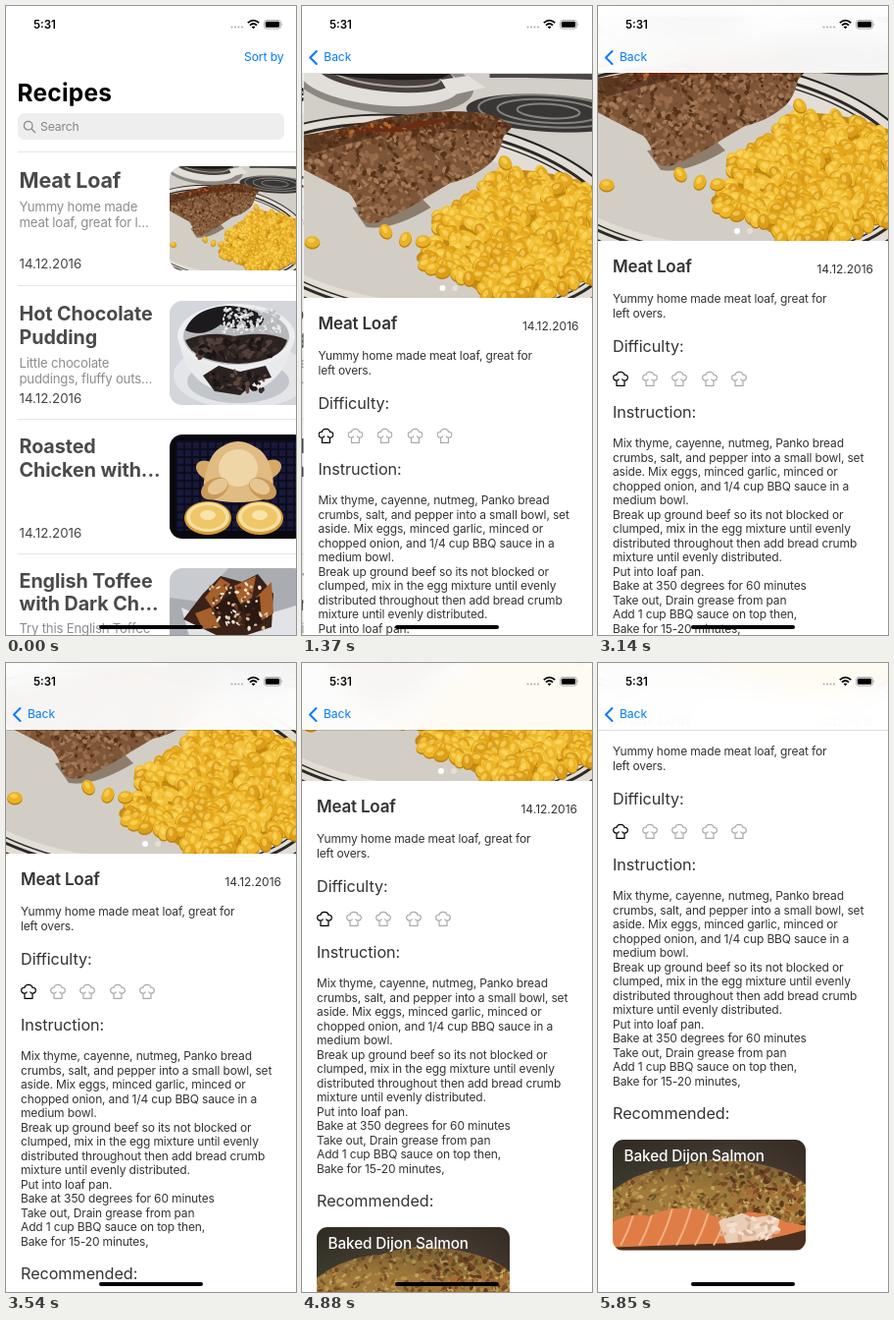
Animation, 296 px wide and 640 px high, one loop 5970 ms. Source, as an HTML page with a canvas:

```html
<!DOCTYPE html>
<html lang="en">
<head>
<meta charset="utf-8">
<title>Recipes</title>
<style>
@property --p { syntax: "<number>"; inherits: true; initial-value: 1; }
@property --s { syntax: "<number>"; inherits: true; initial-value: 0; }
html, body { margin: 0; width: 100%; height: 100%; overflow: hidden; background: #fff; }
#stage {
  position: relative; width: 296px; height: 640px; overflow: hidden; background: #fff;
  font-family: Inter, "Liberation Sans", sans-serif; font-optical-sizing: none;
  animation: push 5970ms step-end infinite, scroll 5970ms step-end infinite;
}
#stage * { position: absolute; }
svg * { position: static; }
/* --p: share of the detail page still off to the right */
@keyframes push {
  0% { --p: 1; }
  15.41% { --p: .78; }
  17.25% { --p: .37; }
  19.09% { --p: .13; }
  21.1% { --p: .035; }
  22.94% { --p: .005; }
  45.72%, 100% { --p: 0; }
}
/* --s: scroll distance of the detail page */
@keyframes scroll {
  0% { --s: 0; }
  45.72% { --s: 7.5; }
  47.73% { --s: 16; }
  50.58% { --s: 34; }
  52.42% { --s: 58; }
  54.27% { --s: 78; }
  56.11% { --s: 92; }
  59.29% { --s: 103; }
  61.3% { --s: 126; }
  63.14% { --s: 150; }
  64.99% { --s: 164; }
  66.83% { --s: 169; }
  81.74% { --s: 177; }
  83.75% { --s: 207; }
  85.59% { --s: 242; }
  87.43% { --s: 270; }
  89.27% { --s: 288; }
  91.12% { --s: 295; }
  92.79% { --s: 290; }
  94.47% { --s: 279; }
  96.31% { --s: 270; }
  97.98%, 100% { --s: 266; }
}
.page { left: 0; top: 0; width: 296px; height: 640px; background: #fff; }
#list { transform: translateX(calc((var(--p) - 1) * 88.8px)); width: 400px; }
#dim { inset: 0; background: #000; opacity: calc((1 - var(--p)) * .1); }
#detail { transform: translateX(calc(var(--p) * 296px)); overflow: hidden; }
#scroller { left: 0; top: 0; width: 296px; height: 900px; transform: translateY(calc(var(--s) * -1px)); }
#line { left: 0; top: 68px; width: 296px; height: 1px; background: rgba(0,0,0,.13); }
#bar { left: 0; top: 0; width: 296px; height: 68px; background: rgba(255,255,255,.94); backdrop-filter: blur(12px); }
#back { left: 0; top: 0; opacity: calc(1 - var(--p)); transform: translateX(calc(var(--p) * 60px)); }
#sort { left: 0; top: 0; opacity: var(--p); }
#field { left: 12px; top: 109px; width: 272px; height: 27px; border-radius: 7px; background: #eeeeef; }
#home { left: 95px; top: 630px; width: 106px; height: 4px; border-radius: 2px; background: #000; }
.sep { left: 12px; width: 388px; height: 1px; background: #e6e6e7; }
.dot { width: 6px; height: 6px; border-radius: 3px; top: 284px; background: #fff; }
.t { line-height: 0; white-space: pre; color: #333; }
.r { transform: translateX(-100%); }
.clock { font: 600 11.5px/0 Inter, sans-serif; color: #000; }
.link { font-size: 12.15px; letter-spacing: -.1px; color: #007aff; }
.large { font-size: 24.5px; font-weight: 700; letter-spacing: .2px; color: #000; }
.hint { font-size: 12.15px; letter-spacing: -.1px; color: #85858a; }
.name { font-size: 19.7px; font-weight: 700; letter-spacing: -.05px; color: #4a4a4a; }
.big { font-size: 21.5px; letter-spacing: -.15px; }
.blurb { font-size: 13.2px; letter-spacing: -.2px; color: #8d8d90; }
.date { font-size: 13.3px; color: #444; }
.small { font-size: 12px; }
.head { font-size: 17px; font-weight: 600; letter-spacing: -.2px; }
.sub { font-size: 16.2px; letter-spacing: -.05px; }
.body { font-size: 12px; letter-spacing: -.15px; }
.card { font-size: 15.3px; font-weight: 500; letter-spacing: -.1px; color: #fff; }
</style>
</head>
<body>
<div id="stage">
  <div id="list" class="page">
    <div id="field"></div>
    <svg style="left:17px;top:116px" width="14" height="14" fill="none" stroke="#85858a" stroke-width="1.2"><circle cx="5.7" cy="5.7" r="4.3"/><path d="M9 9l4 4"/></svg>
    <div id="dim"></div>
  </div>
  <div id="detail" class="page">
    <div id="scroller"></div>
    <div id="line"></div>
  </div>
  <div id="bar"></div>
  <div id="sort"></div>
  <div id="back">
    <svg style="left:6px;top:44px" width="10" height="17" fill="none" stroke="#007aff" stroke-width="2" stroke-linecap="round" stroke-linejoin="round"><path d="M8.5 2L2 8.5L8.5 15"/></svg>
  </div>
  <svg id="status" style="left:228px;top:10px" width="60" height="18">
    <g fill="#aaa"><circle cx="2.5" cy="11.5" r="1"/><circle cx="6" cy="11.5" r="1"/><circle cx="9.5" cy="11.5" r="1"/><circle cx="13" cy="11.5" r="1"/></g>
    <g fill="none" stroke="#000" stroke-width="1.8"><path d="M18.8 7.2Q24.5 2 30.2 7.2"/><path d="M21 9.6Q24.5 6.5 28 9.6"/></g>
    <path d="M22.6 11.2Q24.5 9.6 26.4 11.2L24.5 13.3Z"/>
    <rect x="35.5" y="4.5" width="17" height="8.6" rx="2.5" fill="none" stroke="#999" stroke-width=".8"/>
    <rect x="36.8" y="5.8" width="14.4" height="6" rx="1.4"/>
    <path d="M53.6 7.3Q55.2 8.8 53.6 10.3Z" fill="#999"/>
  </svg>
  <div id="home"></div>
</div>
<script>
const $ = id => document.getElementById(id);
const list = $('list'), dim = $('dim'), scroller = $('scroller');

function add(parent, tag, cls, left, top) {
  const el = document.createElement(tag);
  el.className = cls;
  if (left !== undefined) el.style.left = left + 'px';
  if (top !== undefined) el.style.top = top + 'px';
  parent.insertBefore(el, parent === list ? dim : null);
  return el;
}
// y is the middle of the capitals
function text(parent, x, y, cls, str) {
  add(parent, 'span', 't ' + cls, x, y).textContent = str;
}
function photo(parent, x, y, w, h, radius, draw, sx = 1, sy = 1) {
  const el = add(parent, 'canvas', '', x, y);
  el.width = w * 2;
  el.height = h * 2;
  el.style.cssText += `width:${w}px;height:${h}px;border-radius:${radius}px`;
  const c = el.getContext('2d');
  c.scale(2 * sx, 2 * sy);
  draw(c);
}

const random = seed => () => (seed = seed * 16807 % 2147483647) / 2147483647;
const probe = document.createElement('canvas').getContext('2d');
function fill(c, color, d) {
  c.fillStyle = color;
  c.fill(new Path2D(d));
}
function oval(c, color, x, y, rx, ry, turn = 0) {
  c.fillStyle = color;
  c.beginPath();
  c.ellipse(x, y, rx, ry, turn, 0, 7);
  c.fill();
}
function ring(c, color, width, x, y, rx, ry, turn = 0) {
  c.strokeStyle = color;
  c.lineWidth = width;
  c.beginPath();
  c.ellipse(x, y, rx, ry, turn, 0, 7);
  c.stroke();
}
function within(c, d, draw) {
  c.save();
  c.clip(new Path2D(d));
  draw();
  c.restore();
}
function speckle(c, seed, n, x, y, w, h, size, colors) {
  const r = random(seed);
  for (let i = 0; i < n; i++) {
    const color = colors[Math.floor(r() * colors.length)];
    oval(c, color, x + r() * w, y + r() * h, size * (.4 + r()), size * (.3 + r() * .6), r() * 3);
  }
}
function kernel(c, x, y, turn, color) {
  oval(c, '#bd8310', x, y + 1.3, 7.8, 6.2, turn);
  oval(c, color, x, y, 7.6, 5.8, turn);
  oval(c, 'rgba(255,226,120,.55)', x - 1, y - 1.6, 4, 2.4, turn);
}

function meat(c) {
  fill(c, '#d2cec8', 'M-10 0H350V230H-10Z');
  // stove top
  oval(c, '#8c8781', 82, 8, 92, 32, .1);
  oval(c, '#e2dfda', 78, 6, 82, 26, .1);
  oval(c, '#4a423c', 84, 0, 70, 18, .1);
  ring(c, '#aaa59f', 2, 84, 0, 56, 12, .1);
  fill(c, '#1c1917', 'M26 0H150L140 5Q80 9 26 0Z');
  fill(c, '#e4e1dd', 'M140 6L168 2L186 14L150 22Z');
  fill(c, '#4d4844', 'M190 0H350V9Q250 3 190 4Z');
  oval(c, '#393735', 250, 40, 84, 19, .06);
  for (const k of [.85, .62, .38]) ring(c, '#85827f', 2, 250, 38, 84 * k, 19 * k, .06);
  // plate
  oval(c, '#242220', 120, 152, 219, 109, .12);
  oval(c, '#e2ded6', 120, 150, 215, 105, .12);
  ring(c, '#2b2926', 3, 120, 150, 203, 97, .12);
  ring(c, '#2b2926', 1.5, 120, 150, 196, 92, .12);
  oval(c, '#d3cec5', 110, 152, 178, 80, .12);
  fill(c, 'rgba(95,72,52,.6)', 'M50 136L64 156Q90 160 130 136L120 126Z');

  const loaf = 'M-10 64Q30 58 57 51Q90 42 123 40Q160 36 188 41Q204 46 213 54L204 64Q200 84 188 93Q172 106 150 111L128 124Q100 142 76 151Q62 154 57 144Q54 128 46 121Q24 110-10 92Z';
  fill(c, '#7d5537', loaf);
  within(c, loaf, () => {
    speckle(c, 11, 1500, -10, 36, 230, 120, 3, ['#93694a', '#a67c58', '#6c4529', '#553319', '#80573a', '#996e4b']);
    fill(c, 'rgba(66,34,16,.55)', 'M-10 62Q60 42 165 36L213 54L186 58Q120 52 66 66L-10 86Z');
    speckle(c, 5, 200, 0, 40, 212, 24, 2.5, ['#5a2f18', '#7b4625', '#8e6038']);
    fill(c, '#6b2c13', 'M28 66Q60 50 95 54Q130 44 160 46Q125 52 96 59Q60 58 28 66Z');
    speckle(c, 8, 14, 45, 50, 80, 10, 2.5, ['#b5662c', '#8e3b18']);
  });

  const corn = new Path2D('M116 190Q112 182 132 176L136 144Q152 132 178 122Q186 104 208 98Q250 96 300 116L350 130V196L276 212Q250 230 196 230Q176 222 156 204Q136 204 116 190Z');
  c.fillStyle = '#c48a16';
  c.fill(corn);
  const r = random(77), shades = ['#edb628', '#e4a81c', '#f2c23a', '#dc9e18'];
  for (let i = 0; i < 900; i++) {
    const x = 98 + r() * 250, y = 90 + i / 900 * 142, turn = r() * 3;
    if (probe.isPointInPath(corn, x, y)) kernel(c, x, y, turn, shades[i % 4]);
  }
  [[9, 171], [84, 160], [104, 168], [122, 170], [206, 90]].forEach(([x, y], i) => kernel(c, x, y, i, '#e9b224'));
}

function pudding(c) {
  fill(c, '#d3d6da', 'M0 0H140V106H0Z');
  oval(c, '#e3e5e8', 74, 76, 70, 34);
  oval(c, '#c2c5ca', 70, 82, 52, 22);
  fill(c, '#e9eaec', 'M9 36Q16 92 68 94Q118 92 127 36Z');
  oval(c, '#eceef0', 68, 36, 60, 33);
  oval(c, '#b6b8bc', 68, 36, 54, 29);
  fill(c, '#2c2321', 'M16 40Q40 30 66 36Q100 30 120 40Q114 62 70 64Q24 62 16 40Z');
  speckle(c, 21, 80, 26, 38, 84, 20, 3.5, ['#3e302b', '#1d1615', '#54413a']);
  fill(c, '#1c1a1c', 'M16 30Q24 8 58 5Q92 6 98 22Q76 34 52 24Q34 38 16 30Z');
  speckle(c, 4, 150, 55, 8, 58, 24, 2, ['#d8d9db', '#bcbdc0', '#eeeeef']);
  fill(c, '#2a2220', 'M34 76L50 66L72 72L98 66L104 78L88 82L72 96L46 92Z');
  speckle(c, 9, 45, 38, 72, 62, 20, 3, ['#3a2d29', '#1b1514', '#5a4740']);
}

function chicken(c) {
  fill(c, '#08080e', 'M0 0H140V106H0Z');
  fill(c, '#17183a', 'M6 6H140V98H6Z');
  c.fillStyle = '#0c0c1e';
  for (let i = 0; i < 18; i++) c.fillRect(6 + i * 8, 6, 2, 92);
  for (let i = 0; i < 12; i++) c.fillRect(6, 6 + i * 8, 134, 2);
  oval(c, '#d6a968', 40, 37, 14, 9, .5);
  oval(c, '#d6a968', 101, 36, 14, 9, -.5);
  fill(c, '#e0bc82', 'M54 12Q70 2 86 12Q100 18 104 38Q110 58 96 66Q70 72 42 66Q30 56 38 36Q42 18 54 12Z');
  oval(c, '#efd6a6', 70, 34, 20, 19);
  oval(c, '#cb9a58', 46, 55, 15, 10, -.5);
  oval(c, '#cb9a58', 95, 55, 15, 10, .5);
  oval(c, '#e7c791', 49, 53, 11, 7, -.5);
  oval(c, '#e7c791', 92, 53, 11, 7, .5);
  for (const x of [39, 92]) {
    oval(c, '#d49b35', x, 85, 24, 17);
    oval(c, '#f6dfa0', x, 84, 22, 15);
    oval(c, '#efc768', x, 84, 18, 12);
    oval(c, '#f8e4ac', x, 82, 8, 5);
  }
}

function toffee(c) {
  fill(c, '#a9adb2', 'M0 0H140V106H0Z');
  fill(c, '#c8cbd0', 'M0 0H60L30 34L0 30Z');
  fill(c, '#e2e3e6', 'M12 40Q60 64 140 34V106H30Z');
  fill(c, '#3a2218', 'M14 52L34 26L52 8L74 14L90 6L106 26L104 60L60 74Z');
  for (const d of ['M36 30L52 10L62 16L46 44Z', 'M66 18L88 8L84 30L70 38Z', 'M88 30L104 14L106 46L92 54Z', 'M26 46L42 40L52 60L34 62Z']) fill(c, '#a5602c', d);
  for (const d of ['M44 40L66 24L76 44L58 60Z', 'M76 38L92 28L94 56L78 62Z']) fill(c, '#2b1812', d);
  speckle(c, 31, 70, 40, 16, 60, 46, 2, ['#efe4d2', '#d8bd98', '#6b3d22']);
}

function salmon(c) {
  const g = c.createLinearGradient(0, 0, 197, 40);
  g.addColorStop(0, '#39382c');
  g.addColorStop(.6, '#554b41');
  g.addColorStop(1, '#43352c');
  c.fillStyle = g;
  c.fillRect(0, 0, 197, 113);
  fill(c, '#4a3020', 'M0 92H197V113H0Z');
  fill(c, '#e07d46', 'M0 66L60 58L130 64L197 70V92Q150 106 110 106L0 110Z');
  for (let i = 0; i < 6; i++) {
    c.strokeStyle = '#f2b184';
    c.lineWidth = 2;
    c.stroke(new Path2D(`M${8 + i * 19} 108Q${18 + i * 19} 90 ${24 + i * 19} 66`));
  }
  fill(c, '#e9cdb6', 'M108 84Q126 68 142 80L170 76Q172 98 150 102L116 106Z');
  speckle(c, 13, 30, 112, 80, 56, 22, 4, ['#f3e0cf', '#d9ae90']);
  const crust = 'M0 52Q28 30 66 28Q104 14 146 24Q184 32 197 46V88L176 84Q150 70 128 76Q110 86 92 72Q60 66 38 78Q18 74 0 84Z';
  fill(c, '#a07a3c', crust);
  within(c, crust, () => {
    speckle(c, 17, 700, 0, 16, 197, 74, 2.6, ['#b8924a', '#8a642e', '#c6a660', '#6b5a2a', '#7d4a24', '#9c7436']);
    speckle(c, 19, 90, 120, 30, 77, 56, 3.5, ['#7c4a28', '#5d3a1e', '#a56a34']);
  });
  const shade = c.createLinearGradient(0, 0, 0, 50);
  shade.addColorStop(0, 'rgba(40,34,28,.55)');
  shade.addColorStop(1, 'rgba(40,34,28,0)');
  c.fillStyle = shade;
  c.fillRect(0, 0, 197, 50);
}

// Recipe list
text(list, 11.5, 88, 'large', 'Recipes');
text(list, 35, 123, 'hint', 'Search');
[148, 284, 420, 557].forEach(y => add(list, 'div', 'sep', undefined, y));
photo(list, 167, 163, 140, 106, 13, meat, .43, .465);
photo(list, 167, 299.5, 140, 106, 13, pudding);
photo(list, 167, 436, 140, 106, 13, chicken);
photo(list, 167, 572, 140, 106, 13, toffee);
[
  [177, 'name big', 'Meat Loaf'], [204, 'blurb', 'Yummy home made'], [220, 'blurb', 'meat loaf, great for l…'], [262, 'date', '14.12.2016'],
  [313, 'name', 'Hot Chocolate'], [337, 'name', 'Pudding'], [363, 'blurb', 'Little chocolate'], [379, 'blurb', 'puddings, fluffy outs…'], [399, 'date', '14.12.2016'],
  [448, 'name', 'Roasted'], [471.5, 'name', 'Chicken with...'], [535.5, 'date', '14.12.2016'],
  [585, 'name', 'English Toffee'], [608, 'name', 'with Dark Ch...'], [633, 'blurb', 'Try this English Toffee']
].forEach(([y, cls, str]) => text(list, 13.5, y, cls, str));

// Detail page
photo(scroller, 0, 69, 296, 228, 0, meat);
add(scroller, 'div', 'dot', 138.5);
add(scroller, 'div', 'dot', 151.5).style.opacity = .35;
text(scroller, 15, 323, 'head', 'Meat Loaf');
text(scroller, 281, 326, 'small r', '14.12.2016');
text(scroller, 15, 404, 'sub', 'Difficulty:');
text(scroller, 15, 470.5, 'sub', 'Instruction:');
text(scroller, 15, 724, 'sub', 'Recommended:');
const lines = (y, rows) => rows.forEach((row, i) => text(scroller, 15, y + i * 14.5, 'body', row));
lines(356, ['Yummy home made meat loaf, great for', 'left overs.']);
lines(503, [
  'Mix thyme, cayenne, nutmeg, Panko bread',
  'crumbs, salt, and pepper into a small bowl, set',
  'aside. Mix eggs, minced garlic, minced or',
  'chopped onion, and 1/4 cup BBQ sauce in a',
  'medium bowl.',
  'Break up ground beef so its not blocked or',
  'clumped, mix in the egg mixture until evenly',
  'distributed throughout then add bread crumb',
  'mixture until evenly distributed.',
  'Put into loaf pan.',
  'Bake at 350 degrees for 60 minutes',
  'Take out, Drain grease from pan',
  'Add 1 cup BBQ sauce on top then,',
  'Bake for 15-20 minutes,'
]);
for (let i = 0; i < 5; i++) {
  const hat = add(scroller, 'div', '', 14.7 + i * 30.3, 429);
  hat.innerHTML = `<svg width="16" height="17" fill="none" stroke="${i ? '#aaa' : '#000'}" stroke-width="1.2" stroke-linejoin="round"><path d="M4 15.4V10.2C-.6 9.8-.3 3.8 4 4.3C4.6.3 11.4.3 12 4.3C16.3 3.8 16.6 9.8 12 10.2V15.4ZM4 10.2Q6 10.2 6.4 8.4M12 10.2Q10 10.2 9.6 8.4"/></svg>`;
}
photo(scroller, 15, 750.5, 197, 113.5, 11, salmon);
text(scroller, 26.5, 767.5, 'card', 'Baked Dijon Salmon');

// Bars
text($('sort'), 283.5, 52, 'link r', 'Sort by');
text($('back'), 22, 52, 'link', 'Back');
text($('stage'), 28, 19, 'clock', '5:31');
</script>
</body>
</html>
```
